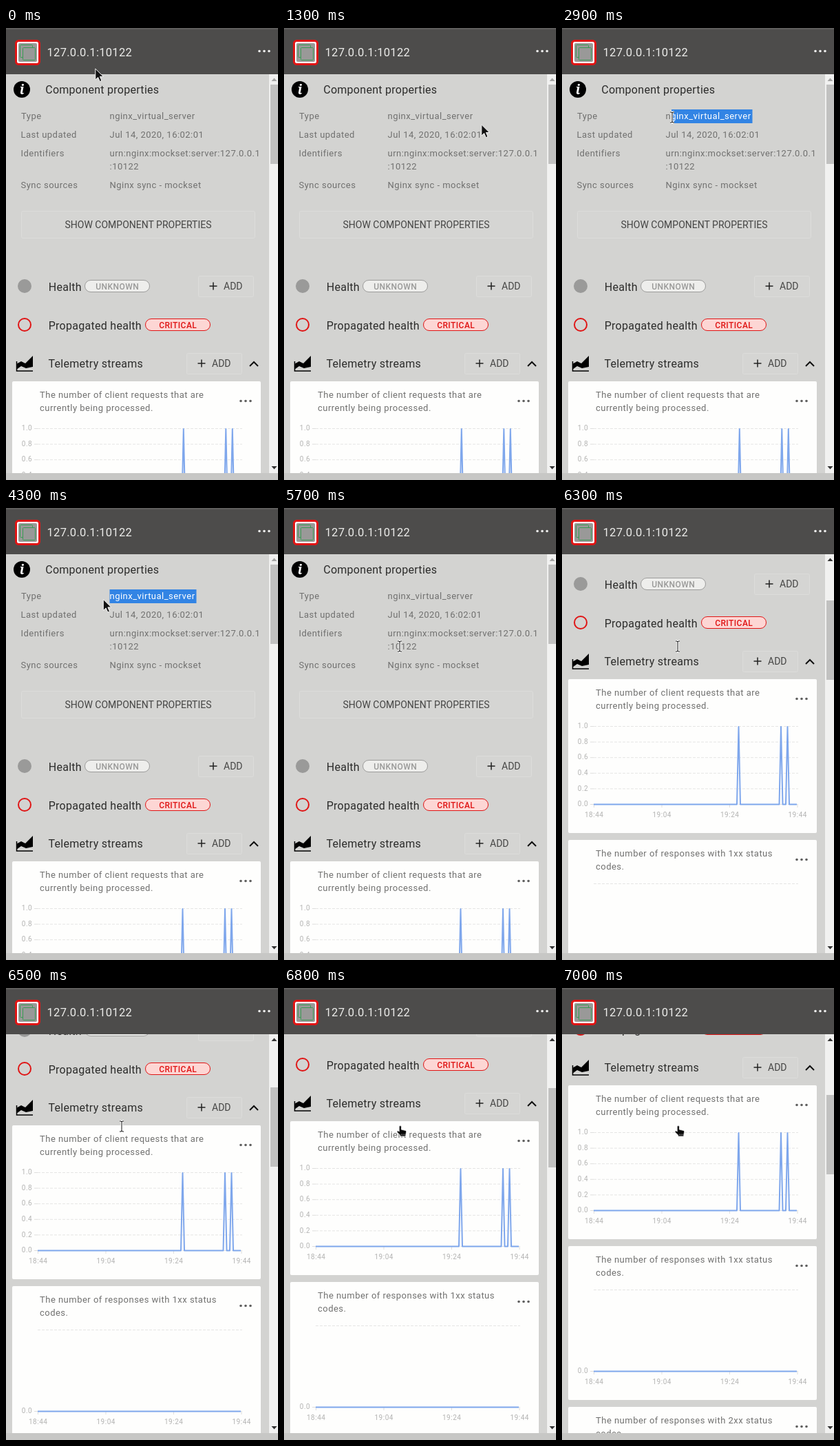
These frames come from a looping animation (395x655 px, 8 s). An HTML page:

```html
<!DOCTYPE html>
<html lang="en">
<head>
<meta charset="utf-8">
<title>Component panel</title>
<style>
  html, body { margin: 0; width: 100%; height: 100%; overflow: hidden; background: #d3d3d1; }
  svg { display: block; width: 395px; height: 655px; }
  text { font-family: Roboto, "Open Sans", sans-serif; white-space: pre; }
  .host { font-size: 16.5px; letter-spacing: .3px; fill: #ececea; }
  .head { font-size: 16px; letter-spacing: .28px; fill: #2c2c2b; }
  .row { font-size: 13px; letter-spacing: .48px; fill: #70706f; }
  .btn { font-size: 14px; fill: #454544; }
  .pill { font-size: 12px; font-weight: 500; letter-spacing: .45px; text-anchor: middle; }
  .axis { font-size: 10px; letter-spacing: .5px; fill: #b3b3b2; }
  .mid { text-anchor: middle; }
  .box { fill: #d5d5d3; stroke: #dcdcda; }
  .grid { stroke: #e5e5e4; stroke-dasharray: 4 2; }
  .tick { stroke: #dededd; }
  .data { fill: none; stroke: #7fa7ec; stroke-width: 2; stroke-linejoin: round; }
  .red { fill: none; stroke: #e01515; }
</style>
</head>
<body>
<svg viewBox="0 0 395 655">
  <defs>
    <clipPath id="view"><rect y="67" width="395" height="578"/></clipPath>
    <clipPath id="picked"><rect id="pickClip" y="118" height="20"/></clipPath>
    <path id="ibeam" d="M-3-7.5H-1L0-6.5L1-7.5H3M0-6.5V6.5M-3 7.5H-1L0 6.5L1 7.5H3"/>
  </defs>
  <rect width="395" height="655" fill="#d3d3d1"/>

  <g clip-path="url(#view)">
    <g id="page">
      <circle cx="23" cy="89" r="12"/>
      <text x="23" y="96" text-anchor="middle" fill="#fff"
        style="font: italic bold 19px 'Noto Serif', serif">i</text>
      <text class="head" x="57.2" y="95">Component properties</text>

      <text class="row" x="22" y="132">Type</text>
      <text class="row" x="150.5" y="132">nginx_virtual_server</text>
      <rect id="pick" y="118" height="20" fill="#3284e4"/>
      <text class="row" x="150.5" y="132" clip-path="url(#picked)" style="fill:#fff">nginx_virtual_server</text>
      <text class="row" x="21.5" y="159">Last updated</text>
      <text class="row" x="150.5" y="159">Jul 14, 2020, 16:02:01</text>
      <text class="row" x="21.5" y="186">Identifiers</text>
      <text class="row" x="150.5" y="186">urn:nginx:mockset:server:127.0.0.1</text>
      <text class="row" x="150.5" y="205">:10122</text>
      <text class="row" x="21.5" y="232">Sync sources</text>
      <text class="row" x="150.5" y="232">Nginx sync - mockset</text>

      <rect class="box" x="22.5" y="265.5" width="339" height="39" rx="2"/>
      <text class="btn mid" x="192" y="290">SHOW COMPONENT PROPERTIES</text>

      <circle cx="27" cy="374" r="10" fill="#9a9a99"/>
      <text class="head" x="61.7" y="381">Health</text>
      <rect x="114.5" y="365.5" width="94" height="17" rx="8.5" fill="#eeeeec" stroke="#9c9c9b"/>
      <text class="pill" x="161.7" y="379" fill="#999998">UNKNOWN</text>

      <circle class="red" cx="27" cy="430" r="9" stroke-width="2"/>
      <text class="head" x="61.7" y="437">Propagated health</text>
      <rect class="red" x="202.5" y="421.5" width="94" height="17" rx="8.5" style="fill:#fdd6d4"/>
      <text class="pill" x="249.7" y="435" fill="#e01515">CRITICAL</text>

      <path d="M15.5 483V497H39" fill="none" stroke="#000" stroke-width="1.5"/>
      <path d="M15 487L22 483L28 486L39 475V491L29 493L22 490L15 495Z"/>
      <text class="head" x="61.5" y="492">Telemetry streams</text>
      <path d="M354 490L360 484L366 490" fill="none" stroke="#111" stroke-width="2"/>
      <g id="adds"></g>
      <g id="cards"></g>
    </g>
  </g>

  <rect x="382" y="67" width="13" height="578" fill="#f1f1f0"/>
  <rect id="thumb" x="384" y="82" width="11" height="115" fill="#c1c1c0"/>
  <path id="up" d="M385.5 77L389.5 72.5L393.5 77Z"/>
  <path d="M385.5 635L389.5 639.5L393.5 635Z" fill="#333"/>
  <rect y="645" width="395" height="10" fill="#c7c7c5"/>

  <rect width="395" height="67" fill="#4d4c4b"/>
  <rect width="395" height="2" fill="#5f5e5d"/>
  <rect class="red" x="14.5" y="18.5" width="34" height="34" rx="4" stroke-width="3" style="fill:#fff"/>
  <g fill="#999998">
    <rect x="18" y="22" width="27" height="27" rx="2"/>
    <rect x="20.5" y="24.5" width="18" height="18" rx="1" stroke="#3c9a55"/>
    <rect x="24.5" y="28.5" width="18" height="18" rx="1" stroke="#3c9a55"/>
  </g>
  <text class="host" x="59.5" y="41">127.0.0.1:10122</text>
  <g id="menu"></g>

  <g id="arrow">
    <path d="M.8 1V17L4.6 13.4L7.3 19.6L10 18.4L7.4 12.4H12.3Z" fill="#111" stroke="#f4f4f4"/>
  </g>
  <g id="beam" fill="none">
    <use href="#ibeam" stroke="#fff" stroke-width="3"/>
    <use href="#ibeam" stroke="#111"/>
  </g>
  <g id="hand">
    <path d="M-.8 0Q1-2 2.4 0V4.6L8.4 6Q9.8 6.4 9.6 8L8.8 12.4V14.5H.6V12.6L-3.8 8.4Q-4.4 6.2-2.4 6.4L-.8 7.6Z"
      fill="#0a0a0a" stroke="#f4f4f4" stroke-width=".8"/>
    <path d="M2.6 11V13M4.8 11V13M7 11V13" stroke="#ddd" stroke-width=".6"/>
  </g>
</svg>
<script>
const $ = id => document.getElementById(id);
const LOOP = 8000, STEP = 100;

const dots = (x, y, fill) => [-7, 0, 7]
  .map(d => `<circle cx="${x + d}" cy="${y}" r="1.8" fill="${fill}"/>`).join('');
const addButton = (x, y) => `
  <rect class="box" x="${x + .5}" y="${y + .5}" width="80" height="30" rx="2"/>
  <path d="M${x + 16.5} ${y + 15}h11m-5.5-5.5v11" stroke="#222" stroke-width="1.5"/>
  <text class="btn" x="${x + 37}" y="${y + 20}">ADD</text>`;
const hline = (cls, x1, x2, y) => `<path class="${cls}" d="M${x1} ${y}H${x2}"/>`;

// A chart card: gridlines at the given levels (0 to 1), labelled where asked.
const BASE = 181.5;
function card(i, lines, levels, line) {
  let s = '<rect x="9" width="361" height="223" rx="2" fill="#fefefd"/>' + dots(348, 28.5, '#5f5f5e');
  lines.forEach((l, n) => s += `<text class="row" x="49" y="${24 + 19 * n}">${l}</text>`);
  for (const [v, labelled] of levels) {
    const y = BASE - 113 * v;
    s += hline('grid', 46, 343, y);
    if (labelled) s += hline('tick', 41, 46, y) +
      `<text class="axis" x="22.8" y="${y + 2.7}">${v.toFixed(1)}</text>`;
  }
  ['18:44', '19:04', '19:24', '19:44'].forEach((l, n) => {
    const x = 46.5 + 98.5 * n;
    s += `<path class="tick" d="M${x} 182v4"/><text class="axis mid" x="${x + .2}" y="199.5">${l}</text>`;
  });
  return `<g transform="translate(0 ${512 + 233 * i})">${s}${line}</g>`;
}
const emptyCard = (i, code) => card(i, [`The number of responses with ${code} status`, 'codes.'],
  [[1.044, false], [0, true]], hline('data', 46, 341, BASE));

$('menu').innerHTML = dots(375, 33.5, '#ededec');
$('adds').innerHTML = addButton(279, 359) + addButton(262, 471);
$('cards').innerHTML =
  card(0, ['The number of client requests that are', 'currently being processed.'],
    Array.from({ length: 6 }, (_, n) => [n / 5, true]), '<path class="data" id="spikes"/>') +
  emptyCard(1, '1xx') + emptyCard(2, '2xx');

const spikes = dx => `M46 ${BASE}` + [256.5, 318, 327.5].map(x => x + dx)
  .map(x => `H${x - 2.5}L${x} 69L${x + 2.5} ${BASE}`).join('') + 'H341';

const progress = (t, a, b) => Math.min(1, Math.max(0, (t - a) / (b - a)));
const easeInOut = p => p * p * (3 - 2 * p);
const easeOut = p => 1 - (1 - p) ** 2.07;

// Pointer moves: start, end, x, y
const moves = [
  [500, 1100, 286, 143], [1200, 1500, 286, 128], [1600, 1800, 282, 127],
  [2200, 2900, 160, 129.5], [3000, 3400, 152, 139], [3800, 3900, 148, 131],
  [4100, 4500, 133, 132], [5400, 5700, 168, 200.5]
];
const pointer = t => moves.reduce(([x, y], [a, b, tx, ty]) => {
  const p = easeInOut(progress(t, a, b));
  return [x + (tx - x) * p, y + (ty - y) * p];
}, [129, 58]);
const shapes = [[6800, 'hand'], [5600, 'beam'], [3900, 'arrow'], [2300, 'beam'], [0, 'arrow']];

const scroll = t => Math.round(319 * easeOut(progress(t, 5900, 6600)) + 52 * easeOut(progress(t, 6800, 7000)));

function draw(now) {
  const t = Math.floor((now % LOOP) / STEP) * STEP;
  const [x, y] = pointer(t), top = scroll(t);

  const shape = shapes.find(s => t >= s[0])[1];
  for (const id of ['arrow', 'beam', 'hand']) $(id).style.display = id === shape ? '' : 'none';
  $(shape).setAttribute('transform', `translate(${x} ${y})`);

  const end = 276.5, selecting = t >= 2300 && t < 4900;
  const left = !selecting ? end : t < 3100 ? Math.min(end, x - 1) : 150.5;
  for (const id of ['pick', 'pickClip']) {
    $(id).setAttribute('x', left);
    $(id).setAttribute('width', end - left);
  }

  $('page').setAttribute('transform', `translate(0 ${-top})`);
  $('thumb').setAttribute('y', 82 + Math.round(top * .197));
  $('up').setAttribute('fill', top > 0 ? '#333' : '#a5a5a4');
  $('spikes').setAttribute('d', spikes(t < 3200 ? 1.3 : 0));
}

const start = performance.now();
function tick() {
  draw(performance.now() - start);
  requestAnimationFrame(tick);
}
tick();
</script>
</body>
</html>
```
